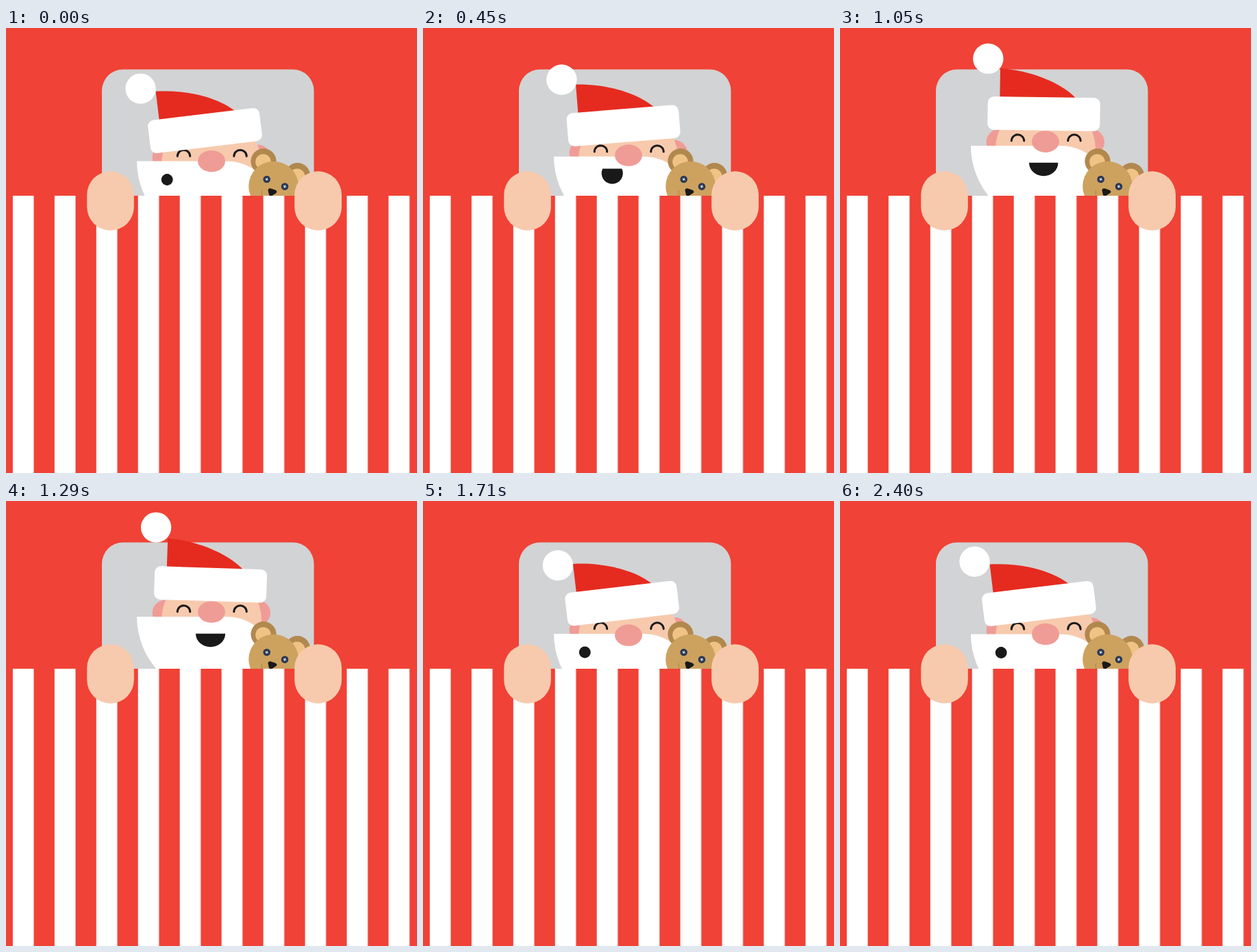
An HTML page for the animation above (2.7 s loop, 600x650 px).

```html
<!DOCTYPE html>
<html lang="en">
<head>
<meta charset="utf-8">
<title>Peeking Santa</title>
<style>
  html, body { margin: 0; width: 100%; height: 100%; overflow: hidden; background: #f04236; }
  svg { display: block; width: 600px; height: 650px; }
  .skin { fill: #f7caad; }
  .pink { fill: #f09c96; }
  .ink { fill: #1a1919; }
  .white { fill: #fff; }
  .fur { fill: #cda25f; }
  .fur-dark { fill: #b1884e; }
  .fur-light { fill: #f0c385; }
  .line { fill: none; stroke: #1a1919; stroke-width: 3; stroke-linecap: round; }
</style>
</head>
<body>
<svg viewBox="0 0 600 650">
  <defs>
    <pattern id="stripes" x="9.9" y="0" width="60.95" height="650" patternUnits="userSpaceOnUse">
      <rect width="30.6" height="650" fill="#fff"/>
    </pattern>
    <g id="button">
      <circle r="5.3" fill="#2b3854"/>
      <path d="M-2.3 0H2.3M0-2.3V2.3" transform="rotate(25)" stroke="#dfe6ee" stroke-width="1.2"/>
    </g>
  </defs>
  <rect width="600" height="650" fill="#f04236"/>
  <rect x="140" y="60.5" width="309.5" height="230" rx="31" fill="#d2d3d4"/>

  <g id="head">
    <circle class="pink" cx="232.2" cy="189" r="18.6"/>
    <circle class="pink" cx="367.4" cy="189" r="18.6"/>
    <circle class="skin" cx="300" cy="200" r="73"/>
    <path class="line" d="M250.3 187.3a9.2 9 0 0 1 18.4 0M332.8 187.3a9.2 9 0 0 1 18.4 0"/>
    <path class="white" d="M191 194.5H320C340 194.5 355 200 372 214L395 308H300A109 114 0 0 1 191 194.5Z"/>
  </g>
  <path id="mouth" class="ink"/>
  <ellipse id="nose" class="pink" cx="300" rx="20" ry="15.8"/>
  <g id="hat">
    <path d="M-64.5-65.5C-25-63.5 23-48 48-22H-64.5Z" fill="#e52b20"/>
    <rect class="white" x="-82" y="-24.3" width="164" height="48.6" rx="9"/>
  </g>
  <circle id="pom" class="white" r="22.2"/>

  <g>
    <circle class="fur-dark" cx="376" cy="194.6" r="18.6"/>
    <circle class="fur-light" cx="375.5" cy="195.6" r="11.3"/>
    <circle class="fur-dark" cx="425.5" cy="215.6" r="18.6"/>
    <circle class="fur-light" cx="425" cy="217" r="11.5"/>
    <circle class="fur" cx="390.6" cy="231.2" r="36.4"/>
    <use href="#button" x="380.7" y="221"/>
    <use href="#button" x="407" y="231.6"/>
    <path d="M373.6 237Q372.6 241 374.5 248" fill="none" stroke="#b1884e" stroke-width="1.2"/>
    <path class="ink" d="M382.5 237Q383 233.5 387 234.5L393.5 236.8Q397 239 394 241.3L387.5 245.5Q384.5 246 383.8 243Z"/>
  </g>

  <rect y="245" width="600" height="405" fill="#f04236"/>
  <rect y="245" width="600" height="405" fill="url(#stripes)"/>
  <rect class="skin" x="118.2" y="209.3" width="68.6" height="86.4" rx="34.3"/>
  <rect class="skin" x="421.2" y="209.3" width="68.8" height="86.4" rx="34.3"/>
</svg>
<script>
const STEP = 30, LOOP = 2700, TOP = 45, LANDED = 60, END = 80;
const [head, mouth, nose, hat, pom] =
  ["head", "mouth", "nose", "hat", "pom"].map(id => document.getElementById(id));

const clamp = x => Math.min(1, Math.max(0, x));
const mix = (a, b, k) => a + (b - a) * k;
const smooth = x => { x = clamp(x); return x * x * (3 - 2 * x); };

// cubic-bezier(.33, 0, .05, 1), solved by bisection
function settle(x) {
  let lo = 0, hi = 1;
  for (let i = 0; i < 24; i++) {
    const s = (lo + hi) / 2, r = 1 - s;
    if (r * r * s + 0.15 * r * s * s + s ** 3 < clamp(x)) lo = s; else hi = s;
  }
  return smooth((lo + hi) / 2);
}

const rise = (n, ease) => n <= TOP ? ease(n / TOP) : 1 - settle((n - TOP) / (LANDED - TOP));

// Loose parts lead on the way up, then swing past rest and come back
function follow(n, up, over) {
  if (n <= TOP) return -up * smooth(n / TOP);
  if (n <= 63) return mix(-up, over, smooth((n - 48) / 15));
  return over * (1 - smooth((n - 63) / (END - 63)));
}

function drawMouth(q, lift) {
  const w = q ** 1.4;
  const rx = mix(8.4, 21.6, w), ry = Math.min(rx, 19.5);
  const x = mix(235.2, 298.6, q);
  const y = 221.5 - 2.2 * q - 5 * w * (1 - w) - lift;
  const cut = Math.min(0.999, 1 - smooth(w));
  const half = rx * Math.sqrt(1 - cut * cut), top = y - cut * ry;
  mouth.setAttribute("d", `M${x - half} ${top}A${rx} ${ry} 0 1 0 ${x + half} ${top}Z`);
}

function draw(now) {
  const n = Math.min(END, Math.floor(now % LOOP / STEP));
  const p = rise(n, smooth), lift = 25.7 * p;
  head.setAttribute("transform", `translate(0 ${-lift})`);
  hat.setAttribute("transform",
    `translate(${mix(290.5, 298.6, p)} ${mix(149.9, 121.8, p)}) rotate(${mix(-6.9, 1.9, p)})`);
  nose.setAttribute("cy", 194.5 - lift + follow(n, 7, 6.9));
  pom.setAttribute("cx", mix(196.5, 219.2, p));
  pom.setAttribute("cy", 88.6 - 38.8 * p + follow(n, 11.5, 15.5));
  drawMouth(rise(n, settle), lift);
}

const start = performance.now();
function tick() {
  draw(performance.now() - start);
  requestAnimationFrame(tick);
}
tick();
</script>
</body>
</html>
```
